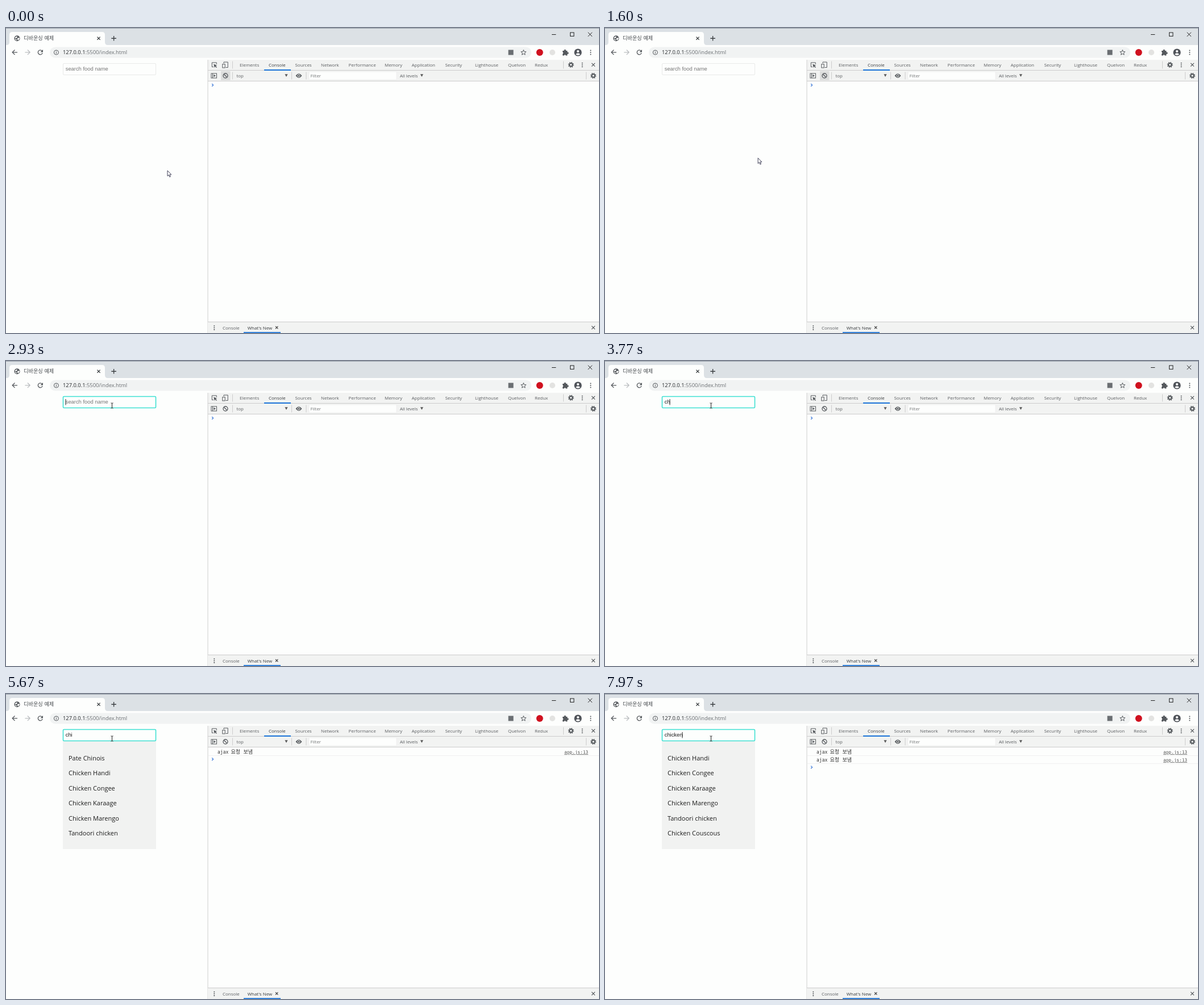
Write an HTML page that moves like this. It is 1043 by 537 pixels and loops after 8 s.

```html
<!DOCTYPE html>
<html lang="ko">
<head>
<meta charset="utf-8">
<title>디바운싱 예제</title>
<style>
  html, body { margin: 0; width: 100%; height: 100%; overflow: hidden; background: #fdfefd; }
  svg { display: block; width: 100vw; height: 100vh; }
  text { white-space: pre; }
  .ui { font-family: "Open Sans", "Noto Sans", sans-serif; }
  .kr { font-family: "Noto Sans CJK KR", "Noto Sans CJK", sans-serif; }
  .arial { font-family: "Liberation Sans", Arial, sans-serif; }
  .mono { font-family: "DejaVu Sans Mono", monospace; }
</style>
</head>
<body>
<svg id="stage" viewBox="0 0 1043 537"></svg>
<script>
const stage = document.getElementById('stage');
const DARK = '#55595d', LINE = '#cccccc', BAR = '#f2f3f2';

function add(tag, attrs, parent = stage) {
  const el = document.createElementNS('http://www.w3.org/2000/svg', tag);
  for (const key in attrs) el.setAttribute(key, attrs[key]);
  parent.appendChild(el);
  return el;
}
const group = () => add('g', {});
const rect = (x, y, width, height, fill, more = {}, parent) =>
  add('rect', { x, y, width, height, fill, ...more }, parent);
const circle = (cx, cy, r, fill, more = {}) => add('circle', { cx, cy, r, fill, ...more });
const shape = (d, fill, parent) => add('path', { d, fill }, parent);
const stroke = (d, color = DARK, width = 1, parent) =>
  add('path', { d, fill: 'none', stroke: color, 'stroke-width': width }, parent);
function text(x, y, content, size, fill = '#5a5d60', font = 'ui', parent) {
  const el = add('text', { x, y, 'font-size': size, fill, class: font }, parent);
  el.textContent = content;
  return el;
}
const cross = (x, y, r, color, width) =>
  stroke(`M${x - r} ${y - r}l${2 * r} ${2 * r}m0 ${-2 * r}l${-2 * r} ${2 * r}`, color, width);
const dots = (x, y, gap = 3.5) => [-gap, 0, gap].forEach(dy => circle(x, y + dy, 1.05, DARK));
const divider = (x, y) => rect(x, y, 1, 13, LINE);
const triangle = (x, y) => shape(`M${x - 2.6} ${y - 2.3}h5.2l-2.6 4.8z`, '#5a5a5a');
function gear(x, y) {
  circle(x, y, 2.7, 'none', { stroke: DARK, 'stroke-width': 2 });
  circle(x, y, 4.3, 'none', { stroke: DARK, 'stroke-width': 1.5, 'stroke-dasharray': '1.7 1.677' });
}

function drawBrowser() {
  rect(0, 0, 1043, 30, '#dce1e5');
  rect(0, 0, 1043, 1, '#98a2aa');
  rect(0, 30, 1043, 26, '#fdfefd');
  shape('M1 30q5 0 5-5v-13q0-5 5-5h158q5 0 5 5v13q0 5 5 5z', '#fdfefd');

  circle(19.5, 18.3, 5, '#55595d');
  shape('M16 16.5l3-2 1 1.5-2 2h-2zM20 18l3.5-1 .3 2-2.3 2.7-1.6-1.4zM15.5 19l2.5.6 1 2.2-1.3.3z', '#fdfefd');
  text(31, 21.3, '디바운싱 예제', 9.2, '#484c50', 'kr');
  cross(163, 18.2, 2.6, '#3c4043', 1.3);
  stroke('M185.3 18.2h8.6M189.6 13.9v8.6', '#3c4043', 1.4);
  stroke('M960 11.5h7.3', '#222', 1);
  rect(992.5, 8, 6.4, 6.4, 'none', { stroke: '#222' });
  cross(1027.3, 11.3, 3.6, '#222', 1);

  stroke('M20 42.8h-8.6M15.5 38.5l-4.3 4.3 4.3 4.3', DARK, 1.3);
  stroke('M33.4 42.8h8.6M37.9 38.5l4.3 4.3-4.3 4.3', '#bbbec0', 1.3);
  stroke('M63.4 40.3a4 4 0 1 0 .8 3.6', DARK, 1.3);
  shape('M65 38v4.4h-4.4z', DARK);
  rect(77, 33.5, 847, 19, '#f1f3f3', { rx: 9.5 });
  circle(88.4, 43, 4, 'none', { stroke: DARK });
  stroke('M88.4 42.3v3M88.4 40.4v1.1', DARK, 1);
  const url = text(100, 46.4, '127.0.0.1', 9.35, '#25282b');
  add('tspan', { fill: '#6a6e72' }, url).textContent = ':5500/index.html';

  rect(883.5, 38.5, 9, 9, '#6a6e72');
  const star = Array.from({ length: 10 }, (_, i) => {
    const a = i * Math.PI / 5, r = i % 2 ? 2.1 : 4.8;
    return `${910.3 + r * Math.sin(a)} ${43.3 - r * Math.cos(a)}`;
  });
  stroke(`M${star.join('L')}z`, DARK, 1);
  circle(938.7, 43, 6, '#d0111f');
  circle(961, 43, 5, '#e3e3e1');
  shape('M979 40h2.6a1.7 1.7 0 1 1 3.2 0h2.5v2.6a1.7 1.7 0 1 1 0 3.1v2.7h-2.6a1.7 1.7 0 0 0-3.2 0H979v-2.8a1.6 1.6 0 0 0 0-3z', DARK);
  circle(1006, 43, 6.6, '#50545a');
  circle(1006, 41, 2.1, '#fdfefd');
  shape('M1001.9 46.2q4.1-3.8 8.2 0q-4.1 3.6-8.2 0z', '#fdfefd');
  dots(1028.3, 43);
}

function drawDevtools() {
  rect(355, 56, 688, 38, BAR);
  rect(354.5, 56, 1, 481, '#cfcfcf');
  rect(355, 74, 688, 1, LINE);
  rect(355, 93, 688, 1, LINE);
  rect(355, 517, 688, 20, BAR);
  rect(355, 517, 688, 1, LINE);

  stroke('M365 68.5h-2.7v-7.6h8v2.8', DARK, 1);
  shape('M365.2 63.5l6 2.3-2.4 1 2.2 2.2-1 1-2.2-2.2-1 2.4z', DARK);
  stroke('M383 62v-2h7.2v9.5h-3.6', DARK, 1);
  rect(380.8, 63.6, 4.4, 6.4, BAR, { stroke: DARK });
  const tabs = [['Elements', 411], ['Console', 462], ['Sources', 508.5], ['Network', 554], ['Performance', 602.5],
    ['Memory', 666], ['Application', 713.5], ['Security', 772.5], ['Lighthouse', 825], ['Quelvon', 883], ['Redux', 930]];
  for (const [name, x] of tabs) text(x, 68, name, 7.95, name === 'Console' ? '#36393c' : '#5a5d60');
  rect(454, 73, 47, 2, '#1a73d8');
  divider(398, 58.5);
  divider(980, 58.5);
  gear(993.7, 64.8);
  dots(1013.6, 65, 3.3);
  cross(1033, 64.8, 2.9, DARK, 1.2);

  rect(361, 80, 9.5, 8, 'none', { stroke: DARK });
  stroke('M363.5 80v8', DARK, 1);
  shape('M365.3 81.8l3.8 2.2-3.8 2.2z', DARK);
  const clearFocus = rect(378, 76, 16.5, 16, '#dcdddc');
  circle(386, 84, 4, 'none', { stroke: DARK, 'stroke-width': 1.3 });
  stroke('M383.2 81.2l5.6 5.6', DARK, 1.3);
  [398, 502, 527.5, 1020].forEach(x => divider(x, 77.5));
  text(405.5, 87, 'top', 7.95);
  triangle(493, 83.6);
  shape('M509.5 84q5.5-7.4 11 0q-5.5 7.4-11 0z', DARK);
  circle(515, 84, 2.1, 'none', { stroke: BAR, 'stroke-width': 1 });
  rect(533, 77, 154, 14, '#fdfefd', { stroke: '#e6e6e6', 'stroke-width': .6 });
  text(535.5, 87.3, 'Filter', 7.95, '#757779');
  text(692.7, 87, 'All levels', 7.95);
  triangle(731.3, 83.6);
  gear(1033, 84);

  dots(366.3, 527.8, 3.3);
  text(381, 531, 'Console', 7.95);
  text(424.7, 531, "What's New", 7.95, '#36393c');
  cross(476.2, 527.3, 2.2, '#444', 1.2);
  rect(418, 535.3, 65, 1.7, '#1a73d8');
  cross(1033, 527.5, 2.9, DARK, 1.2);
  return clearFocus;
}

function drawLog(index) {
  const g = group(), y = 105 + index * 14.1;
  text(372, y, 'ajax', 8, '#303030', 'mono', g);
  text(395.5, y, '요청', 9, '#303030', 'kr', g);
  text(417.5, y, '보냄', 9, '#303030', 'kr', g);
  const link = text(982, y, 'app.js:13', 7.75, '#555', 'mono', g);
  link.setAttribute('text-decoration', 'underline');
  rect(356, y + 3, 687, 1, '#f0f0f0', {}, g);
  return g;
}

drawBrowser();
const clearFocus = drawDevtools();
const logs = [0, 1].map(drawLog);
const prompt = stroke('M362.2 98.2l2.4 2.3-2.4 2.3', '#3b78d8', 1.2);

const dropdown = group();
rect(100, 83, 164, 190, '#f1f2f1', {}, dropdown);
const rows = Array.from({ length: 6 }, (_, i) =>
  text(110, 117 + i * 26.4, '', 11, '#1c1c1c', 'ui', dropdown));

const field = rect(100.5, 62.5, 163, 20, '#fdfefd', { rx: 1.5 });
const fieldText = text(104.7, 75.3, '', 9.4, '#222', 'arial');
const caret = rect(0, 67, 1, 10.5, '#222');
const arrow = group();
add('path', { d: 'M0 0v9.7l2.2-2 1.6 3.6 1.6-.7-1.6-3.5h3z', fill: '#fdfefd', stroke: '#30304a', 'stroke-width': .9 }, arrow);
const beam = stroke('M-2 -4.5h1.5l.5.5.5-.5h1.5M0 -4v8M-2 4.5h1.5l.5-.5.5.5h1.5', '#222', 1);

const LOOP = 8000, CLICK = 2700, BLINK = 500;
const keys = [[CLICK, ''], [3300, 'c'], [3600, 'ch'], [4150, 'chi'], [5700, 'chic'],
  [7250, 'chick'], [7500, 'chicke'], [7750, 'chicken']];
const requests = [5150, 6700], responses = [5500, 7050];
const meals = ['Pate Chinois', 'Chicken Handi', 'Chicken Congee', 'Chicken Karaage',
  'Chicken Marengo', 'Tandoori chicken', 'Chicken Couscous'];
const path = [[0, 284, 251], [1450, 284, 251], [2100, 175, 89], [2220, 175, 88], [2550, 186.5, 78.5], [LOOP, 186.5, 78.5]];

const show = (el, on) => el.setAttribute('display', on ? 'inline' : 'none');
const passed = (times, t) => times.filter(time => t >= time).length;

function pointerAt(t) {
  const i = path.findIndex(p => t < p[0]);
  const [t0, x0, y0] = path[i - 1], [t1, x1, y1] = path[i];
  const u = (t - t0) / (t1 - t0), ease = u * u * (3 - 2 * u);
  return [x0 + (x1 - x0) * ease, y0 + (y1 - y0) * ease];
}

function render(t) {
  const [x, y] = pointerAt(t), overField = y < 83;
  show(arrow, !overField);
  show(beam, overField);
  (overField ? beam : arrow).setAttribute('transform', `translate(${x} ${y})`);

  const focused = t >= CLICK;
  show(clearFocus, !focused);
  field.setAttribute('stroke', focused ? '#3fe0d2' : '#e9eae9');
  field.setAttribute('stroke-width', focused ? 1.6 : 1);

  const [pressed, typed] = keys.filter(k => t >= k[0]).pop() || [0, ''];
  fieldText.textContent = typed || 'search food name';
  fieldText.setAttribute('fill', typed ? '#1c1c1c' : '#757575');
  show(caret, focused && Math.floor((t - pressed) / BLINK) % 2 === 0);
  caret.setAttribute('x', Math.round(104.5 + (typed ? fieldText.getComputedTextLength() : 0)) - .5);

  const sent = passed(requests, t), received = passed(responses, t);
  logs.forEach((log, i) => show(log, i < sent));
  prompt.setAttribute('transform', `translate(0 ${sent * 14.2})`);
  show(dropdown, received > 0);
  rows.forEach((row, i) => { row.textContent = meals[i + Math.max(0, received - 1)]; });
}

function tick() {
  render(performance.now() % LOOP);
  requestAnimationFrame(tick);
}
tick();
</script>
</body>
</html>
```
